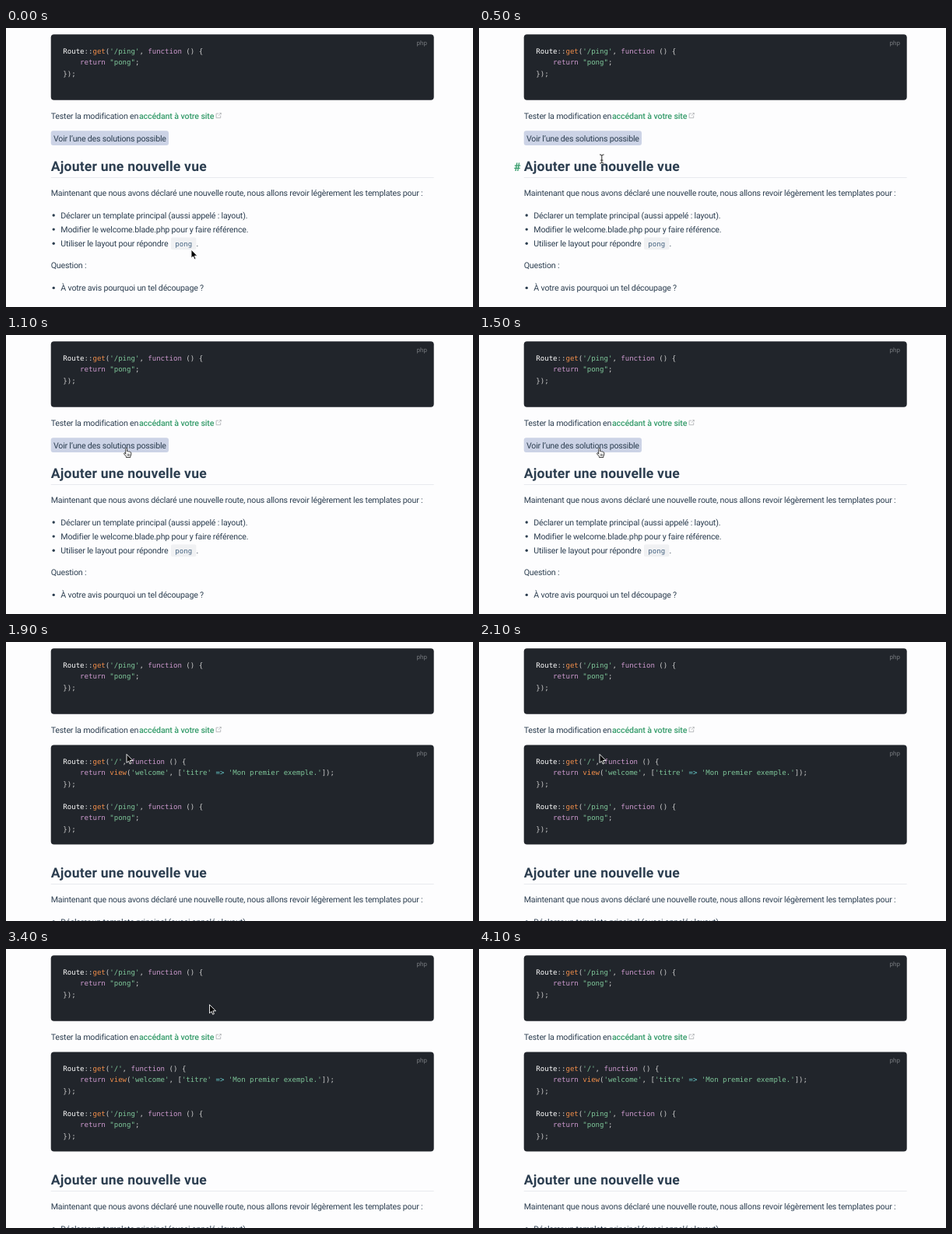
An HTML page that plays this animation: 600 px wide and 359 px high, repeating every 4700 ms.

```html
<!DOCTYPE html>
<html lang="fr">
<head>
<meta charset="utf-8">
<title>Ajouter une nouvelle vue</title>
<style>
  html, body { margin: 0; width: 100%; height: 100%; overflow: hidden; background: #fdfdfe; }
  svg { display: block; width: 100vw; height: 100vh; text-rendering: geometricPrecision; }
  text { font: 10.64px Roboto, sans-serif; letter-spacing: -.18px; fill: #2c3e50; white-space: pre; }
  .link { font-weight: 500; letter-spacing: -.13px; fill: #369c6b; }
  .title { font-size: 17.56px; font-weight: 600; letter-spacing: .22px; }
  .anchor { font-size: 14.9px; font-weight: 600; fill: #369c6b; }
  .lang { font-size: 8px; letter-spacing: 0; fill: #777a7f; }
  .code { font: 9.05px "DejaVu Sans Mono", monospace; letter-spacing: 0; fill: #fff; }
  .inline { fill: #476582; }
  .string { fill: #7ec699; }
  .keyword { fill: #cc99cd; }
  .call { fill: #f08d49; }
  .operator { fill: #67cdcc; }
  .punct { fill: #ccc; }
  .block { fill: #21252b; }
</style>
</head>
<body>
<svg viewBox="0 0 600 359">
  <g id="first"></g>

  <text x="57.7" y="116.5">Tester la modification en</text>
  <text class="link" x="171" y="116.5">accédant à votre site</text>
  <g transform="translate(268.2 107.6)" fill="none" stroke="#a9abae" stroke-width=".8">
    <path d="M5 2.5H1.9V8.1H7.5V5"/>
    <path d="M4.8 5.2L8 2M6.2 1.9H8.1V3.8"/>
  </g>

  <g id="button">
    <rect x="57.7" y="132.3" width="151.3" height="18.6" rx="3" fill="#ccd3e6"/>
    <text x="61" y="145.6" style="letter-spacing:-.21px">Voir l’une des solutions possible</text>
  </g>
  <g id="solution"></g>

  <g id="below">
    <text id="anchor" class="anchor" x="44.8" y="183.7">#</text>
    <text class="title" x="57.7" y="184.3">Ajouter une nouvelle vue</text>
    <rect x="57.7" y="192" width="492" height=".8" fill="#e4e6ea"/>
    <text x="57.7" y="215.9">Maintenant que nous avons déclaré une nouvelle route, nous allons revoir légèrement les templates pour :</text>
    <g id="bullets"></g>
    <text x="70.3" y="244.6">Déclarer un template principal (aussi appelé : layout).</text>
    <text x="70.3" y="262.7">Modifier le welcome.blade.php pour y faire référence.</text>
    <text x="70.3" y="280.8">Utiliser le layout pour répondre</text>
    <rect x="212" y="269.4" width="32.4" height="15.8" rx="2" fill="#f0f1f3"/>
    <text class="code inline" x="217.3" y="280.8">pong</text>
    <text x="244.6" y="280.8">.</text>
    <text x="57.7" y="309.4">Question :</text>
    <text x="70.3" y="338">À votre avis pourquoi un tel découpage ?</text>
  </g>

  <g id="cursor" stroke-linejoin="round" stroke-linecap="round">
    <path id="arrow" d="M0 0V10.6L2.5 8.4L4.2 12.2L5.9 11.4L4.3 7.7H7.6Z" fill="#000" stroke="#fff" stroke-width=".9"/>
    <g id="beam" fill="none">
      <path d="M-2.4 -5.6Q0 -5.6 0 -4.2Q0 -5.6 2.4 -5.6M0 -4.2V4.2M-2.4 5.6Q0 5.6 0 4.2Q0 5.6 2.4 5.6M-1.2 1.6H1.2" stroke="#fff" stroke-width="2"/>
      <path d="M-2.4 -5.6Q0 -5.6 0 -4.2Q0 -5.6 2.4 -5.6M0 -4.2V4.2M-2.4 5.6Q0 5.6 0 4.2Q0 5.6 2.4 5.6M-1.2 1.6H1.2" stroke="#111" stroke-width=".9"/>
    </g>
    <g id="hand" stroke="#111" stroke-width=".8">
      <path d="M-1.5 1.7V-4.5Q-1.4 -5.6 -.6 -5.6Q.3 -5.6 .4 -4.5V-1.3Q1.6 -2 2.3 -.9Q3.4 -1.4 4 -.4Q5.4 -.7 5.6 .7V3.2L4.6 5.2V6.5H-.8V5.4L-3.5 2Q-3.9 .8 -2.8 .6Q-2.2 .6 -1.5 1.7Z" fill="#fff"/>
      <path d="M.8 2.2V4.6M2.3 2.2V4.6M3.8 2.2V4.6" stroke-width=".55"/>
    </g>
  </g>
</svg>
<script>
const LOOP = 4700, OPEN_AT = 1900, SHIFT = 119, LINE = 14.47;
const $ = id => document.getElementById(id);

function add(parent, tag, attrs, text) {
  const el = document.createElementNS("http://www.w3.org/2000/svg", tag);
  for (const key in attrs) el.setAttribute(key, attrs[key]);
  if (text !== undefined) el.textContent = text;
  parent.append(el);
  return el;
}

const TOKEN = /(?<string>'[^']*'|"[^"]*")|(?<keyword>\b(?:return|function)\b)|(?<call>\b(?:get|view)\b)|(?<operator>=>)|(?<punct>[()[\]{},;:]+)|(?<plain>\s+|\w+)/g;

function codeBlock(parent, top, rows, lines) {
  add(parent, "rect", { class: "block", x: 57.7, y: top, width: 492, height: rows * LINE + 26.7, rx: 4 });
  add(parent, "text", { class: "lang", x: 527.6, y: top + 13.8 }, "php");
  lines.forEach((line, i) => {
    const row = add(parent, "text", { class: "code", x: 73.3, y: top + 24.4 + i * LINE });
    for (const { 0: word, groups } of line.matchAll(TOKEN)) {
      const kind = Object.keys(groups).find(name => groups[name]);
      add(row, "tspan", { class: kind }, word);
    }
  });
}

const ping = ["Route::get('/ping', function () {", '    return "pong";', "});"];
codeBlock($("first"), 8.2, 4, ping);
codeBlock($("solution"), 132.6, 7, [
  "Route::get('/', function () {",
  "    return view('welcome', ['titre' => 'Mon premier exemple.']);",
  "});",
  "",
  ...ping
]);
for (const y of [241, 259.1, 277.2, 334.4]) {
  add($("bullets"), "circle", { cx: 61.2, cy: y, r: 1.7, fill: "#2c3e50" });
}

// time, pointer shape, x, y
const steps = [
  [0, "arrow", 238, 285.5],
  [100, "arrow", 222, 266],
  [200, "arrow", 189.5, 229],
  [400, "beam", 166, 186],
  [500, "beam", 157.8, 168.5],
  [600, "beam", 157, 162],
  [700, "beam", 156.5, 157],
  [800, "beam", 156, 153],
  [900, "beam", 156, 150],
  [1000, "hand", 155.2, 151],
  [1900, "arrow", 155, 144.8],
  [3300, "arrow", 174, 128],
  [3400, "arrow", 261.5, 72],
  [3500, "none", 0, 0]
];

const show = (id, on) => $(id).setAttribute("visibility", on ? "visible" : "hidden");

function draw(t) {
  const [, shape, x, y] = steps.findLast(step => step[0] <= t);
  const open = t >= OPEN_AT;
  show("button", !open);
  show("solution", open);
  show("anchor", t >= 400 && t < 1000);
  $("below").setAttribute("transform", `translate(0 ${open ? SHIFT : 0})`);
  $("cursor").setAttribute("transform", `translate(${x} ${y})`);
  for (const id of ["arrow", "beam", "hand"]) show(id, id === shape);
}

const start = performance.now();
function tick() {
  draw((performance.now() - start) % LOOP);
  requestAnimationFrame(tick);
}
tick();
</script>
</body>
</html>
```
